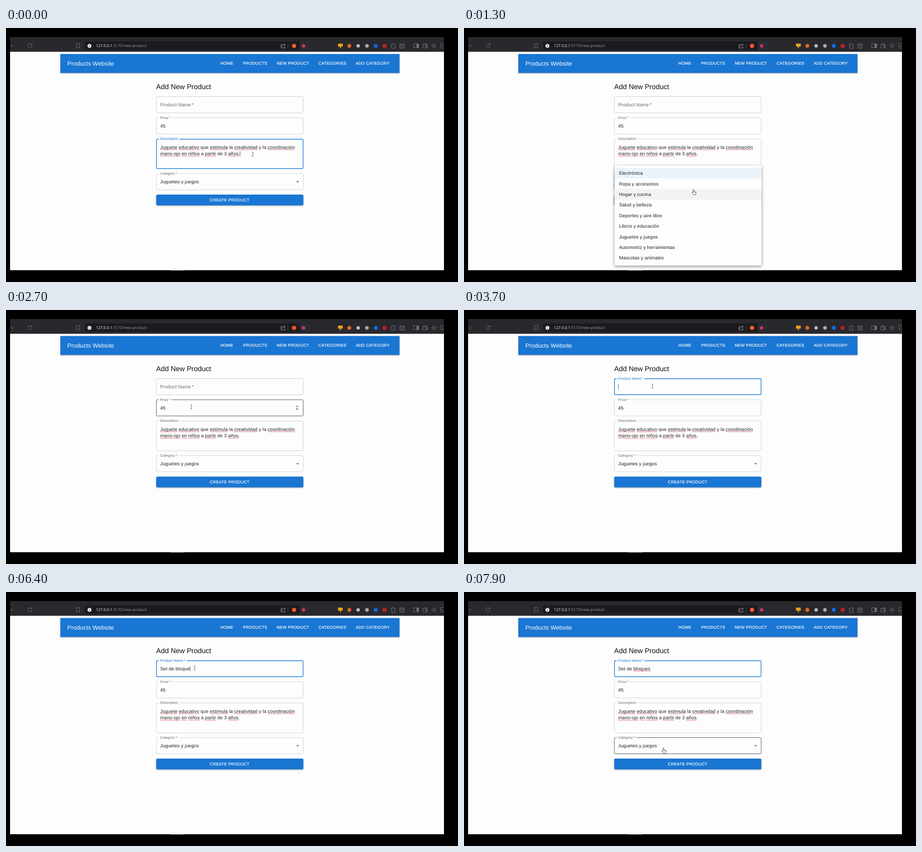
These frames come from a looping animation (998x561 px, 8 s). An HTML page:

```html
<!DOCTYPE html>
<html lang="en">
<head>
<meta charset="utf-8">
<title>Add New Product</title>
<style>
  html, body { margin: 0; width: 100%; height: 100%; overflow: hidden; background: #000; }
  svg { display: block; width: 100vw; height: 100vh; text-rendering: geometricPrecision; }
  text { font: 10.4px "Liberation Sans", Arial, sans-serif; letter-spacing: .00938em; fill: #212121; white-space: pre; }
  .url { font: 8.6px "Open Sans", "Noto Sans", sans-serif; letter-spacing: 0; fill: #9b9ba3; }
  .url .host { fill: #f4f4f6; }
  .brand { font-size: 13px; letter-spacing: .0075em; fill: #fff; }
  .btn { font-size: 9.1px; letter-spacing: .02857em; fill: #fff; stroke: #fff; stroke-width: .2; }
  .title { font-size: 15.6px; letter-spacing: 0; fill: #111; }
  .label { font-size: 7.8px; fill: #666; }
  .box { fill: none; stroke: #c4c4c4; stroke-width: .8; transform-box: fill-box; transform-origin: center; }
  .hover .box { stroke: #212121; }
  .focus .box { stroke: #1976d2; stroke-width: 1.4; transform: scale(.998, .985); }
  .focus .label { fill: #1976d2; }
  .gap { fill: #fdfdfd; }
  .blue { fill: #1976d2; }
  .raised { filter: drop-shadow(0 1.3px 1.4px rgba(0,0,0,.36)); }
  .squiggle { fill: none; stroke: #dc3540; stroke-width: .7; }
  .icon { fill: none; stroke: #7a7a82; stroke-width: .9; stroke-linejoin: round; stroke-linecap: round; }
  .paper { fill: #fdfdfd; filter: drop-shadow(0 2px 3.2px rgba(0,0,0,.45)); }
</style>
</head>
<body>
<svg viewBox="0 0 998 561" preserveAspectRatio="none">
  <defs><clipPath id="screen"><rect x="9" y="20" width="958" height="516"/></clipPath></defs>
  <rect width="998" height="561"/>
  <g clip-path="url(#screen)">
    <rect x="9" y="20" width="958" height="32.5" fill="#28282d"/>
    <rect x="174" y="29.5" width="496" height="18.5" rx="4" fill="#1b1b1f"/>
    <rect x="648" y="29.5" width="22" height="18.5" rx="4" fill="#2b2b32"/>
    <g class="icon">
      <path d="M18 39.5H11.5M14.5 36l-3.3 3.5 3.3 3.5" stroke="#5a5a62"/>
      <path d="M57 36.8a4.6 4.6 0 1 0 .5 3.5M57.6 34.5v2.8h-2.8"/>
      <path d="M156 34.5h6.5v10l-3.2-2.6-3.3 2.6z"/>
      <path d="M610 36.5h-2.7v7.5h8.7v-3M609.5 41c.5-3 2.5-4.3 6.5-4.3M613.8 34.2l2.7 2.5-2.7 2.6" stroke="#b4b4bb"/>
      <path d="M622.5 34v11" stroke="#55555d"/>
      <path d="M851 36h2.5c-1-3 3.5-3 2.6 0h3.4v3c-3-.8-3 3.6 0 2.7v3.3h-8.5v-3.3c2.5.6 2.5-3.4 0-2.7z"/>
      <path d="M870 35h9.5v9.5H870zM870 37.5h9.5M872.5 40h4.5M872.5 42.2h3"/>
      <path d="M900.5 35h10.5v8.5h-10.5z"/>
      <path d="M907.3 35.5h3.2v7.5h-3.2z" fill="#7a7a82"/>
      <path d="M920.5 36.2c0-1.2 6-1.6 8.5-1.2v2h1v7h-9.5zM920.5 37h9M927 39.5h3.5v2.3H927z"/>
      <path d="M944.5 34.3l1.5 3.4 3.5 1.4-3.5 1.5-1.5 3.5-1.5-3.5-3.4-1.5 3.4-1.4zM949 43v2"/>
      <path d="M964 34l4 1.5v4c0 3-2 4.5-4 5.5-2.3-1-4.3-2.5-4.3-5.5v-4zM962 39.5l2 2 3-3"/>
    </g>
    <circle cx="184.3" cy="39.5" r="4.4" fill="#f0f0f2"/>
    <path d="M184.3 39v3M184.3 36.7v1" stroke="#1c1c21" stroke-width="1.2"/>
    <text class="url" x="198.5" y="42.3"><tspan class="host">127.0.0.1</tspan>:5173/new-product</text>
    <g id="badges"></g>

    <rect x="9" y="52.5" width="958" height="482.5" fill="#fdfdfd"/>
    <path d="M363 535.5h31" stroke="#56607c" stroke-width="1"/>
    <g class="raised"><rect class="blue" x="120" y="57.5" width="748.8" height="41.8"/></g>
    <text class="brand" x="135.5" y="82.9">Products Website</text>
    <g id="nav"></g>
    <text class="title" x="331.6" y="135.3">Add New Product</text>
    <g id="form"></g>
    <g class="raised"><rect class="blue" x="331.7" y="368.1" width="324.8" height="23.6" rx="2.6"/></g>
    <text class="btn" x="494" y="382.6" text-anchor="middle">CREATE PRODUCT</text>
    <g id="menu"></g>
    <g id="pointer"></g>
  </g>
</svg>
<script>
const LOOP = 8000, STEP = 100;
const $ = id => document.getElementById(id);

function add(parent, tag, attrs, content) {
  const el = document.createElementNS('http://www.w3.org/2000/svg', tag);
  for (const k in attrs) el.setAttribute(k, attrs[k]);
  if (content) el.textContent = content;
  parent.appendChild(el);
  return el;
}
const show = (el, on) => { el.style.display = on ? '' : 'none'; };
const clamp = v => Math.max(0, Math.min(1, v));
const easeOut = v => 1 - (1 - clamp(v)) ** 3;

// Toolbar badges: centre, radius, colour
[[636, 4.8, '#f4572d'], [657, 3.8, '#c8385a'], [758, 4.4, '#d9691f'], [777.5, 3.8, '#b9bccd'],
 [797, 4, '#a9a9b0'], [816.5, 4.4, '#1668e8'], [836, 4.8, '#b3222b']]
  .forEach(([cx, r, fill]) => add($('badges'), 'circle', { cx, cy: 39.5, r, fill }));
add($('badges'), 'path', { d: 'M733 34.5h10.5v6.5H733zM737 41h2.5v3.5H737z', fill: '#e8a31c' });

[['HOME', 473.4], ['PRODUCTS', 523.8], ['NEW PRODUCT', 597.8], ['CATEGORIES', 690], ['ADD CATEGORY', 772.2]]
  .forEach(([s, x]) => add($('nav'), 'text', { class: 'btn', x, y: 81.3 }, s));

// Form
const LEFT = 331.7, WIDTH = 324.8, TEXT_X = 340.6;
function field(label, y, h) {
  const g = add($('form'), 'g', {});
  add(g, 'rect', { class: 'box', x: LEFT + .3, y, width: WIDTH - .6, height: h, rx: 2.6 });
  const gap = add(g, 'rect', { class: 'gap', x: 337.4, y: y - 1.2, height: 2.8 });
  const lab = add(g, 'text', { class: 'label', x: TEXT_X, y: y + 2.4 }, label);
  const full = lab.getComputedTextLength() + 6;
  gap.setAttribute('width', full);
  return { g, gap, lab, full, y, h };
}
function line(f, y, s) {
  return add(f.g, 'text', { x: TEXT_X, y }, s || '');
}
function squiggle(f, text, words, base) {
  const g = add(f.g, 'g', { class: 'squiggle' });
  for (const w of words) {
    const i = text.textContent.indexOf(w);
    const x = text.getStartPositionOfChar(i).x;
    const n = Math.round(text.getSubStringLength(i, w.length) / 1.3);
    let d = `M${x} ${base}`;
    for (let k = 0; k < n; k++) d += `l1.3 ${k % 2 ? 1.5 : -1.5}`;
    add(g, 'path', { d });
  }
  return g;
}

// Required labels end in a thin space and an asterisk
const fields = {
  name: field('Product Name\u2009*', 151.5, 35.8),
  price: field('Price\u2009*', 198.2, 35.8),
  desc: field('Description', 245, 66),
  cat: field('Category\u2009*', 321.6, 35.8)
};
const { name, price, desc, cat } = fields;
const NAME = 'Set de bloques ';
const nameText = line(name, 173, NAME);
const nameWave = squiggle(name, nameText, ['bloques'], 175.4);
line(price, 219.7, '45');
const line1 = line(desc, 266.8, 'Juguete educativo que estimula la creatividad y la coordinación');
const line2 = line(desc, 281.3, 'mano-ojo en niños a partir de 3 años.');
squiggle(desc, line1, ['Juguete', 'educativo', 'estimula', 'creatividad', 'coordinación'], 269.5);
squiggle(desc, line2, ['mano-ojo', 'en', 'niños', 'partir', 'años'], 284);
const catText = line(cat, 342.9);
add(cat.g, 'path', { d: 'M640.6 338.2h6.6l-3.3 3.4z', fill: '#757575' });
const spinner = add(price.g, 'path', { d: 'M639.6 214.3l3.2-3.4 3.2 3.4zM639.6 217.6l3.2 3.4 3.2-3.4z', fill: '#757575' });
const caret = add($('form'), 'rect', { width: .8, height: 11, fill: '#222' });
const descEnd = TEXT_X + line2.getComputedTextLength();

// Dropdown
const ITEMS = ['Electrónica', 'Ropa y accesorios', 'Hogar y cocina', 'Salud y belleza', 'Deportes y aire libre',
  'Libros y educación', 'Juguetes y juegos', 'Automotriz y herramientas', 'Mascotas y animales'];
const TOP = 303.7, ROW = 23.4, FIRST = TOP + 5.2;
const menu = $('menu');
add(menu, 'rect', { class: 'paper', x: 332.2, y: TOP, width: WIDTH, height: 221, rx: 2.6 });
const rows = ITEMS.map((s, i) => {
  const y = FIRST + i * ROW;
  const bg = add(menu, 'rect', { x: 332.2, y, width: WIDTH, height: ROW });
  add(menu, 'text', { x: 342.4, y: y + 15.2 }, s);
  return bg;
});

// Pointer shapes, drawn around their hot spot
const pointer = $('pointer');
const shapes = {
  beam: add(pointer, 'path', { d: 'M-2-4.5q1.6 0 2 .8q.4-.8 2-.8M0-3.7v7.6M-2 4.7q1.6 0 2-.8q.4.8 2 .8', fill: 'none', stroke: '#555', 'stroke-width': .9 }),
  hand: add(pointer, 'path', { d: 'M-1.6-4.6q0-1.2 1-1.2t1 1.2v3.6l3.7.8q1.2.3 1.1 1.6l-.6 3.4-.7 1.6h-4.4L-4 1.9q-.6-1 .2-1.4t2.2 1.3zM2 .2v1.6M3.7.5v1.5', fill: '#fff', stroke: '#333', 'stroke-width': .8 }),
  arrow: add(pointer, 'path', { d: 'M-2-5v10l2.3-2.1 1.5 3.4 1.5-.7-1.5-3.2h3z', fill: '#fff', stroke: '#222', 'stroke-width': .8 })
};

// Timeline: [time, x, y]
const PATH = [[0, 545, 279], [200, 538, 338], [400, 528, 328], [700, 528, 328], [1000, 521, 340], [1200, 512, 350],
  [1700, 467, 466.5], [2000, 467, 466.5], [2700, 409, 214], [2900, 409, 212], [3300, 416.5, 168], [6900, 416.5, 168],
  [7300, 425, 262], [7600, 436, 328], [7800, 441, 350], [LOOP, 441, 350]];
const FOCUS = [[0, 'desc'], [200, 'cat'], [2500, ''], [3400, 'name']];
const PICKED = [[0, 6], [500, 0], [2000, 6]];
const MENUS = [[200, 500], [1000, 2000]];
const KEYS = [4600, 4700, 4800, 5000, 5100, 5200, 5300, 5500, 5800, 6000, 6100, 6300, 6400, 6500, 6900];

const at = (list, t) => list.filter(e => e[0] <= t).pop()[1];

function position(t) {
  const i = PATH.findIndex(p => p[0] > t);
  const [a, b] = [PATH[i - 1], PATH[i]];
  const k = (t - a[0]) / (b[0] - a[0]), s = k * k * (3 - 2 * k);
  return [a[1] + (b[1] - a[1]) * s, a[2] + (b[2] - a[2]) * s];
}

function drawMenu(t, y, picked) {
  const span = MENUS.find(([a, b]) => t >= a && t < b + 200);
  show(menu, span);
  if (!span) return false;
  const [a, b] = span;
  const open = easeOut((t - a + 60) / 260), fade = 1 - clamp((t - b) / 200);
  const s = .75 + .25 * open;
  menu.setAttribute('transform', `translate(494 ${TOP}) scale(${s} ${s * s}) translate(-494 ${-TOP})`);
  menu.style.opacity = open * fade;
  const over = Math.floor((y - 4 - FIRST) / ROW);
  rows.forEach((r, i) => r.setAttribute('fill', i === picked ? 'rgba(25,118,210,.08)'
    : i === over ? 'rgba(0,0,0,.04)' : 'none'));
  return t < b;
}

function render(t) {
  const [x, y] = position(t), focus = at(FOCUS, t), picked = at(PICKED, t);
  const open = drawMenu(t, y, picked);
  const hover = open ? '' : Object.keys(fields).find(k => y >= fields[k].y && y <= fields[k].y + fields[k].h);
  for (const k in fields)
    fields[k].g.setAttribute('class', k === focus ? 'focus' : k === hover ? 'hover' : '');
  catText.textContent = ITEMS[picked];
  show(spinner, hover === 'price');

  const float = easeOut((t - 3400) / 200);
  name.lab.style.fontSize = 10.4 - 2.6 * float + 'px';
  name.lab.setAttribute('y', 172.5 - 18.6 * float);
  name.gap.setAttribute('width', name.full * float);

  const typed = KEYS.filter(k => k <= t);
  nameText.textContent = NAME.slice(0, typed.length);
  show(nameWave, typed.length === NAME.length);

  const since = t - (focus === 'name' ? typed[typed.length - 1] || 3400 : 0);
  show(caret, (focus === 'name' || focus === 'desc') && since % 1060 < 530);
  const end = typed.length ? TEXT_X + nameText.getComputedTextLength() : TEXT_X;
  caret.setAttribute('x', focus === 'name' ? end : descEnd);
  caret.setAttribute('y', focus === 'name' ? 163.8 : 272.3);

  const shape = open || hover === 'cat' ? 'hand' : hover ? 'beam' : 'arrow';
  for (const k in shapes) show(shapes[k], k === shape);
  pointer.setAttribute('transform', `translate(${x} ${y})`);
}

function tick() {
  const t = performance.now() % LOOP;
  render(Math.floor(t / STEP) * STEP);
  requestAnimationFrame(tick);
}
tick();
</script>
</body>
</html>
```
